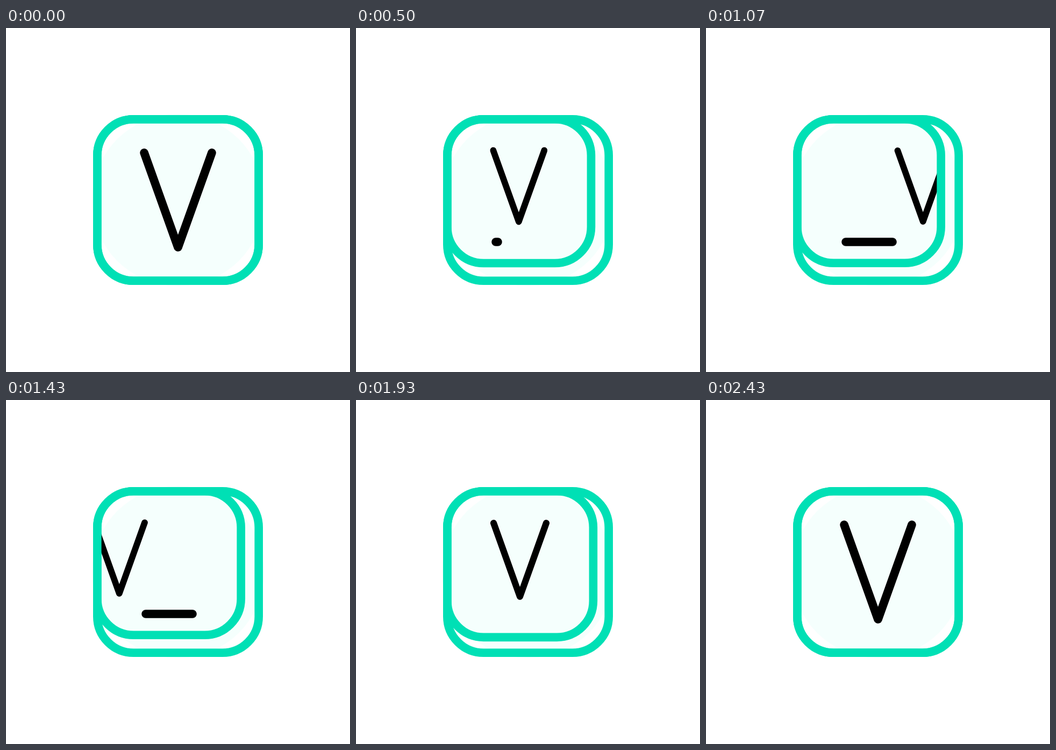
Animation of 640x640 px, one loop 2.78 s. Source, as an HTML page with a canvas:

```html
<!DOCTYPE html>
<html>
<head>
<meta charset="utf-8">
<style>
  html, body { margin: 0; height: 100%; overflow: hidden; background: #fff; }
  canvas { display: block; width: 640px; height: 640px; }
</style>
</head>
<body>
<canvas id="stage" width="640" height="640"></canvas>
<script>
const ctx = document.getElementById('stage').getContext('2d');
const LOOP = 2780, FPS = 14, LAST_STEP = 34;
const LINE = 15.6, GREEN = '#00e0b5';

const mix = (a, b, p) => a + (b - a) * p;

// Smooth 0..1 progress between two times
function ease(t, start, end) {
  const x = Math.min(1, Math.max(0, (t - start) / (end - start)));
  return x * x * (3 - 2 * x);
}

function cardPath(size) {
  ctx.beginPath();
  ctx.roundRect(169.8, 169.8, size, size, 67.5);
}

function strokeCard(size) {
  cardPath(size);
  ctx.strokeStyle = GREEN;
  ctx.lineWidth = LINE;
  ctx.stroke();
}

function strokeLine(points, width) {
  ctx.beginPath();
  points.forEach(([x, y]) => ctx.lineTo(x, y));
  ctx.strokeStyle = '#000';
  ctx.lineWidth = width;
  ctx.stroke();
}

function draw(t) {
  const shrink = ease(t, 0, 527) - ease(t, 1804, 2364);
  const move = ease(t, 0, 475) - ease(t, 1804, 2364);
  const scale = mix(1, 0.75, ease(t, 0, 540) - ease(t, 1804, 2406));
  const cardSize = mix(300.4, 267.4, shrink);

  ctx.fillStyle = '#fff';
  ctx.fillRect(0, 0, 640, 640);
  ctx.fillStyle = '#f5fffd';
  ctx.beginPath();
  ctx.arc(320, 320, 160, 0, 7);
  ctx.fill();

  ctx.lineCap = ctx.lineJoin = 'round';
  strokeCard(300.4);

  // The letter leaves on the right and comes back in from the left
  const travel = 374 * ease(t, 708, 1773);
  const slide = travel < 187 ? travel : travel - 374;
  const x = mix(320, 302.8, move) + slide;
  const y = mix(320, 294, move);
  const w = 63 * scale, h = 88 * scale;

  ctx.save();
  cardPath(cardSize);
  ctx.clip();
  strokeLine([[x - w, y - h], [x, y + h], [x + w, y - h]], LINE * scale);
  ctx.restore();

  const from = mix(260, 347, ease(t, 1525, 1875));
  const to = mix(260, 347, ease(t, 455, 805));
  if (to > from) strokeLine([[from, 398], [to, 398]], LINE);

  strokeCard(cardSize);
}

function tick() {
  const now = performance.now() % LOOP;
  const step = Math.min(LAST_STEP, Math.floor((now + 5) * FPS / 1000));
  draw(step * 1000 / FPS);
  requestAnimationFrame(tick);
}
tick();
</script>
</body>
</html>
```
